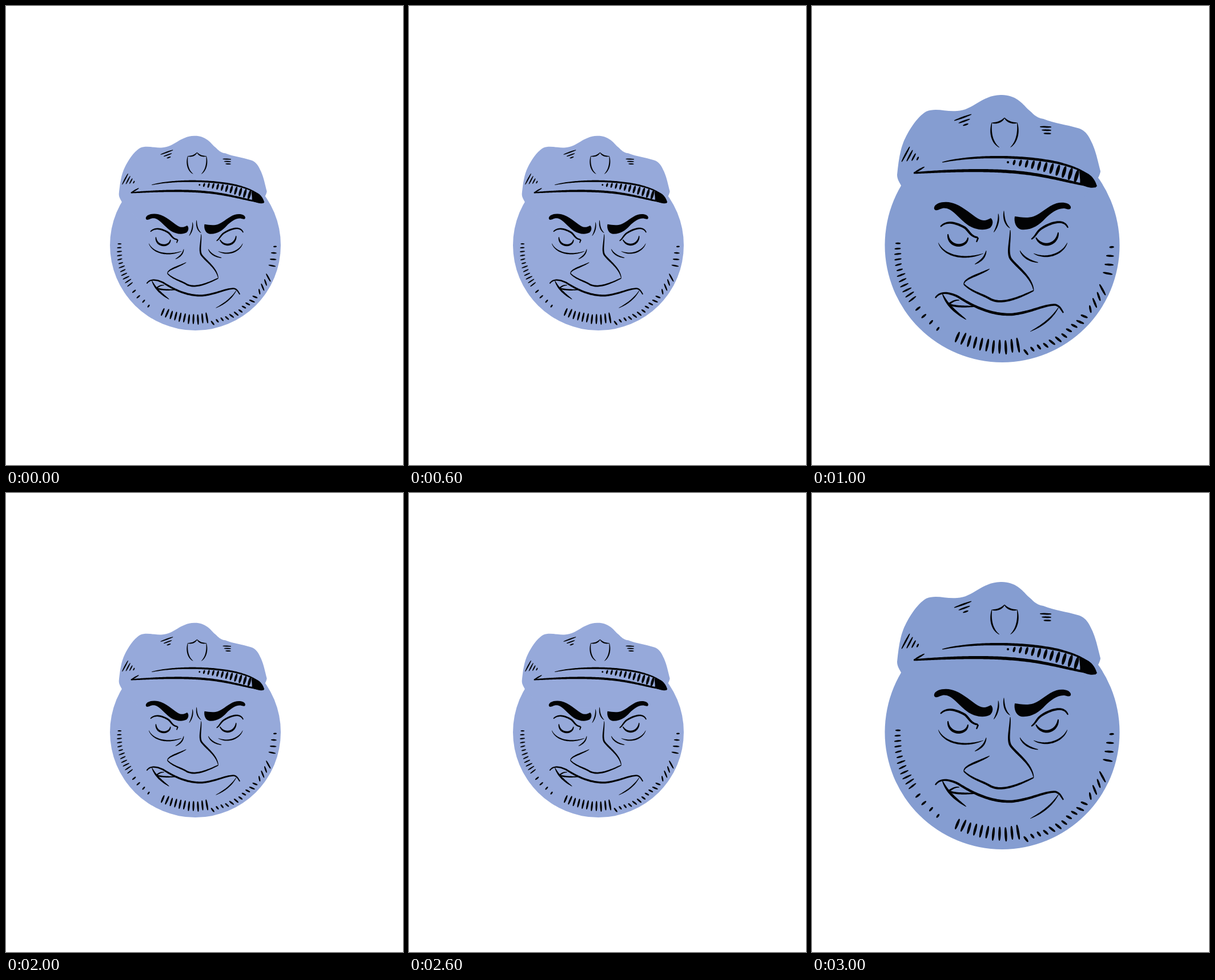
Recreate the animation shown at these times as an HTML page. Size 695 by 805 pixels, loop 4000 ms.

```html
<!DOCTYPE html>
<html lang="en">
<head>
<meta charset="utf-8">
<title>Pulsing officer</title>
<style>
html, body { margin: 0; width: 100%; height: 100%; overflow: hidden; background: #fff; }
svg { display: block; width: 100vw; height: 100vh; }
#officer { filter: blur(.5px); }
</style>
</head>
<body>
<svg viewBox="0 0 695 805">
  <g id="officer">
    <g id="skin">
      <circle cx="333" cy="419.5" r="205.5"/>
      <path d="M157 317C154 310 149 305 149 296C151 277 153 257 160 239C168 220 183 195 200 185C217 178 235 186 254 184C282 183 296 157 330 156C355 155 368 170 378 181C387 188 391 196 405 198C425 206 445 208 465 214C480 218 485 229 491 242C498 258 501 275 505 290C504 297 500 302 500 304L460 360H200Z"/>
    </g>
    <g id="ink" fill="#020304">
      <path d="M214 353C216 345 232 342 244 345C262 349 276 364 291 373C300 378 306 376 313 372C318 376 317 384 312 389C300 395 286 392 274 385C258 374 248 358 236 355C228 353 224 357 219 358C215 359 213 356 214 353Z"/>
      <path d="M453 352C451 345 438 343 428 346C412 351 402 364 388 369C376 373 364 370 355 369C353 378 357 390 366 392C384 394 398 384 408 373C418 363 430 354 442 355C448 357 454 358 453 352Z"/>
      <path d="M468 290C482 290 494 299 499 316C492 322 480 317 470 313Z"/>
    </g>
  </g>
</svg>
<script>
const officer = document.getElementById('officer');
const skin = document.getElementById('skin');
const ink = document.getElementById('ink');
const face = { x: 333, y: 419.5 };
const rad = Math.PI / 180;
const mix = (a, b, t) => a + (b - a) * t;

function newPath(d) {
  const path = document.createElementNS('http://www.w3.org/2000/svg', 'path');
  path.setAttribute('d', d);
  return path;
}

let seed = 7;
function jitter(size) {
  seed = seed * 16807 % 2147483647;
  return (seed / 2147483647 - .5) * 2 * size;
}

// Ink line along a path, widest in the middle
function brush(width, d, tip = .25) {
  const guide = newPath(d), total = guide.getTotalLength();
  const steps = Math.ceil(total / 3) + 4;
  const left = [], right = [];
  for (let s = 0; s <= steps; s++) {
    const t = s / steps, at = t * total;
    const p = guide.getPointAtLength(at);
    const a = guide.getPointAtLength(at - .5), b = guide.getPointAtLength(at + .5);
    const len = Math.hypot(b.x - a.x, b.y - a.y) || 1;
    const half = width / 2 * mix(tip, 1, Math.max(0, Math.sin(Math.PI * t)) ** .6);
    const nx = (a.y - b.y) / len * half, ny = (b.x - a.x) / len * half;
    left.push(`${p.x + nx} ${p.y + ny}`);
    right.unshift(`${p.x - nx} ${p.y - ny}`);
  }
  ink.append(newPath(`M${left.concat(right).join('L')}Z`));
}

// Straight mark around its middle
function mark(x, y, angle, length, width) {
  const dx = Math.cos(angle * rad) * length / 2, dy = Math.sin(angle * rad) * length / 2;
  brush(width, `M${x - dx} ${y - dy}L${x + dx} ${y + dy}`, .35);
}

// Parallel marks that get shorter
function hatch(x, y, stepX, stepY, count, angle, length, last) {
  for (let i = 0; i < count; i++) {
    mark(x + i * stepX, y + i * stepY, angle, mix(length, last, i / (count - 1)), 2.8);
  }
}

// Marks along the jaw, roughly pointing at the middle of the face
function stubble({ from, to, count, radius = 187, length, last = length, width = 3.6, tilt = 0 }) {
  for (let i = 0; i < count; i++) {
    const t = i / (count - 1), angle = mix(from, to, t), r = radius + jitter(1.5);
    mark(face.x + r * Math.cos(angle * rad), face.y + r * Math.sin(angle * rad),
      angle + tilt + jitter(4), mix(length, last, t) + jitter(2), width);
  }
}

// Cap
brush(3, 'M315 205C324 206 332 203 337 196');
brush(3, 'M359 205C350 206 342 203 337 196');
brush(3, 'M315 204C311 222 315 240 328 248', .1);
brush(3, 'M359 204C363 222 358 240 347 248', .1);
brush(4.5, 'M228 274C290 260 380 264 430 275C470 285 492 297 497 316');
brush(5.5, 'M178 293C250 288 320 286 380 294C430 301 460 312 497 317', .5);
brush(3, 'M178 293L197 282');
hatch(264, 195.5, 2.5, 6.3, 3, -20, 32, 10);
hatch(409, 212, 1.5, 5.8, 3, 2, 20, 13);
hatch(164, 260, 7, 2.5, 4, 118, 30, 7);

// Brim shading grows towards the peak
for (let i = 0; i < 13; i++) {
  const t = i / 12;
  mark(mix(343, 474, t), 274 + 28 * t ** 1.7, 106, mix(4, 23, Math.sqrt(t)), mix(4, 6.5, t));
}

// Frown
brush(2.8, 'M326 364C328 376 324 388 318 397', .1);
brush(2.8, 'M336 359C335 374 339 384 347 390', .1);

// Eyes
brush(4, 'M225 387C237 374 256 382 268 389C276 396 278 405 291 406L288 414', .5);
brush(4, 'M448 389C441 371 416 381 402 390C393 396 392 404 384 409', .5);
brush(4.8, 'M238 400C238 425 272 425 273 406', .3);
brush(4.8, 'M392 406C402 426 430 420 431 397', .3);
brush(3.2, 'M221 415C230 438 265 447 300 434', .1);
brush(3.2, 'M388 434C412 446 440 434 447 415', .1);
brush(3, 'M305 429C303 440 298 446 285 453', .2);
brush(3, 'M364 429C369 440 380 447 396 450', .2);

// Nose
brush(4, 'M347 393C347 415 342 430 347 442C356 456 385 474 388 499', .2);
brush(3.4, 'M311 461C290 473 264 478 266 489', .2);
brush(3.8, 'M266 488C280 502 300 506 312 514C328 522 350 518 388 499', .5);

// Mouth
brush(4.6, 'M216 512C222 502 236 500 256 510C290 532 320 542 350 541C385 537 405 524 426 524C434 526 436 532 440 538', .5);
brush(4.4, 'M228 504C236 524 250 536 270 550', .1);
brush(3.6, 'M258 516C250 515 245 519 239 523C252 528 268 527 287 527', .3);
brush(3, 'M432 528C420 548 404 560 382 571', .1);

// Jaw, from the left cheek round to the right one
stubble({ from: 181, to: 149, count: 12, radius: 184, length: 10, last: 17, width: 3, tilt: -4 });
stubble({ from: 143, to: 127.5, count: 4, radius: 185, length: 9 });
stubble({ from: 116, to: 81, count: 11, radius: 178, length: 20, last: 25, width: 4.4 });
stubble({ from: 77.5, to: 41, count: 11, radius: 191, length: 11, last: 14, width: 4, tilt: -22 });
stubble({ from: 36, to: 24, count: 4, radius: 191, length: 15, last: 20, tilt: 40 });
stubble({ from: 15, to: 1, count: 4, radius: 191, length: 18, last: 10, tilt: -5 });

function update(ms) {
  const big = Math.floor(ms / 1000) % 2 === 1;
  officer.setAttribute('transform', big ? '' : 'translate(331.5 419.5) scale(.7275) translate(-333 -419.5)');
  skin.setAttribute('fill', big ? '#859dd1' : '#96a9da');
}

const start = performance.now();
function tick() {
  update(performance.now() - start);
  requestAnimationFrame(tick);
}
tick();
</script>
</body>
</html>
```
